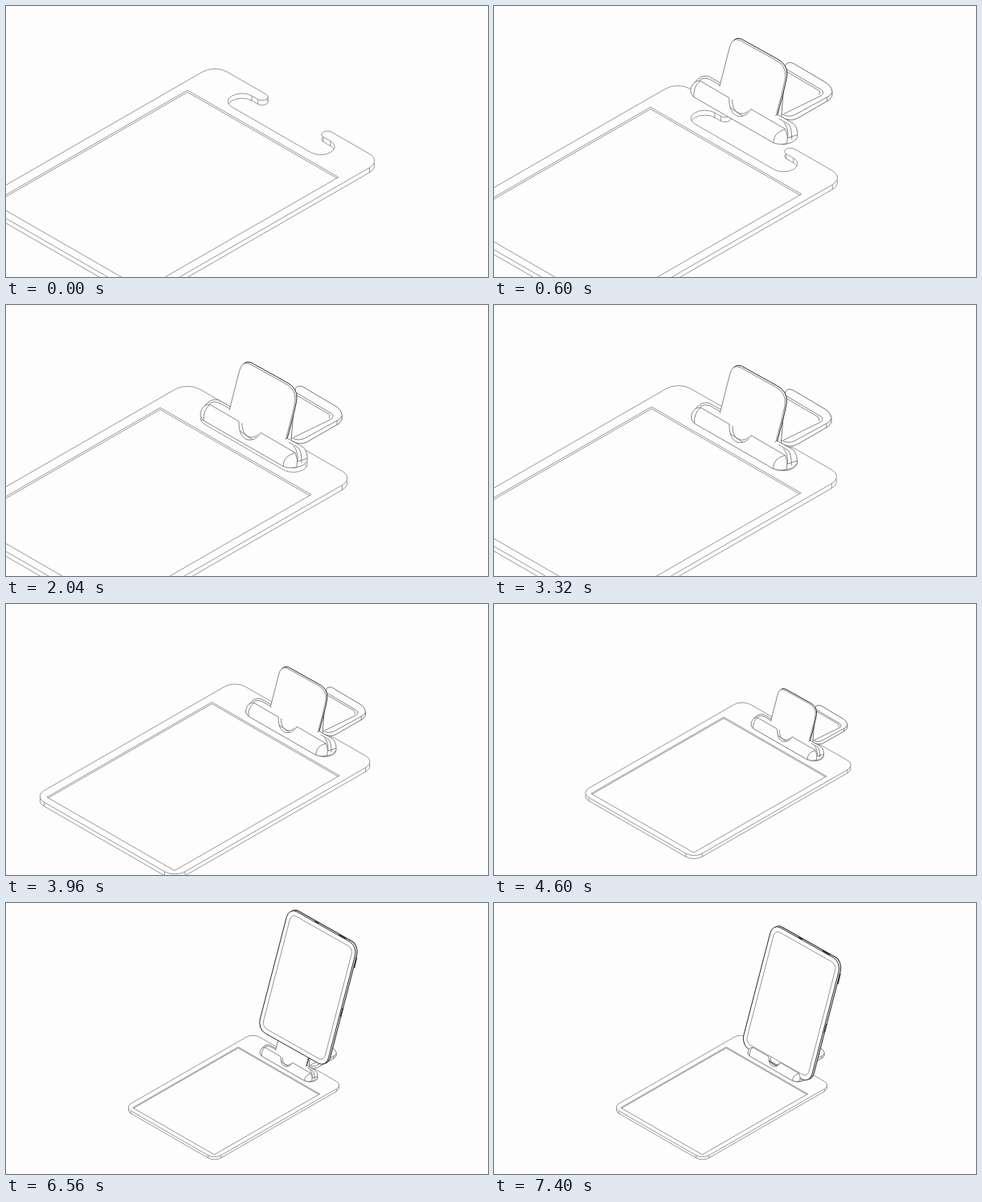
Write an HTML page with a canvas that moves like this. It is 600 px wide and 338 px high and loops after 8000 ms.

```html
<!DOCTYPE html>
<html lang="en">
<head>
<meta charset="utf-8">
<title>Clipboard stand assembly</title>
<style>
  html, body { margin: 0; width: 100%; height: 100%; overflow: hidden; background: #fdfdfd; }
  canvas { display: block; width: 600px; height: 338px; }
</style>
</head>
<body>
<canvas id="stage" width="600" height="338"></canvas>
<script>
const ctx = document.getElementById('stage').getContext('2d');
const LOOP = 8000, PAPER = '#fdfdfd', INK = '#555', DARK = '#2b2b2b';
const SLOPE = 0.577, THICKNESS = 6;

// time, paper corner x, paper corner y, zoom
const CAMERA = [
  [3280, 192, 128, 1], [3320, 196, 127, .99], [4160, 275, 121, .8], [4600, 286, 141, .68],
  [4980, 288, 168, .6], [5240, 289, 178.5, .548], [5480, 289, 179.6, .54]
];
const CLIP_IN = 480, CLIP_SEATED = 2280, CLIP_SPEED = .02;
const TABLET_IN = 5440, TABLET_SEATED = 7400, TABLET_SPEED = .0238;

function camera(t) {
  if (t < CAMERA[0][0]) {
    const rest = (1 - Math.min(t / 840, 1)) ** 2;
    return [192 + 34 * rest, 128 - 23 * rest, 1];
  }
  const next = CAMERA.findIndex(key => key[0] > t);
  if (next < 0) return CAMERA.at(-1).slice(1);
  const from = CAMERA[next - 1], to = CAMERA[next];
  const p = (t - from[0]) / (to[0] - from[0]);
  return [1, 2, 3].map(i => from[i] + (to[i] - from[i]) * p);
}

function mapped(path, matrix) {
  const result = new Path2D();
  result.addPath(path, new DOMMatrix(matrix));
  return result;
}
const onBoard = path => mapped(path, [1, SLOPE, -1, SLOPE, 0, 0]);
const shifted = (path, x, y) => mapped(path, [1, 0, 0, 1, x, y]);

function boardOutline() {
  const p = new Path2D(), q = Math.PI / 2;
  const left = -10.5, right = 197, top = -44.5, bottom = 251.5, r = 15;
  p.moveTo(left + r, top);
  p.arc(53.6, -39.25, 5.25, -q, q);
  p.arc(46, -21.75, 12.25, -q, q, true);
  p.arc(144, -21.75, 12.25, q, -q, true);
  p.arc(135, -39.25, 5.25, q, 3 * q);
  p.arcTo(right, top, right, bottom, r);
  p.arcTo(right, bottom, left, bottom, r);
  p.arcTo(left, bottom, left, top, r);
  p.arcTo(left, top, right, top, r);
  p.closePath();
  return onBoard(p);
}

function boardVerticals() {
  const p = new Path2D();
  const ends = [[197, -29.5], [197, 236.5], [182, 251.5], [4.5, 251.5], [46, -34], [53.6, -34],
    [57.3, -43], [135, -34], [144, -34]];
  for (const [a, b] of ends) {
    p.moveTo(a - b, (a + b) * SLOPE);
    p.lineTo(a - b, (a + b) * SLOPE + THICKNESS);
  }
  return p;
}

function rounded(x, y, w, h, r) {
  const p = new Path2D();
  p.roundRect(x, y, w, h, r);
  return p;
}

const board = boardOutline(), verticals = boardVerticals();
const recess = onBoard(rounded(0, 0, 188, 243, 0));

const clip = {
  leg: new Path2D('M360 88Q364 83 370 86L412 111Q420 117 418 127L414 132L374 155Q366 159 355 153Z'),
  legLines: new Path2D('M361 93L405 119Q409 122 405 126L358 149M361 96L402 120Q404 122 402 125M418 122Q417 126 412 128L372 150Q364 154 355 149M412 128V133'),
  rear: new Path2D('M247 110Q254 100 264 102L370 161Q376 167 375 178Q371 186 357 187Z'),
  rearLines: new Path2D('M253 107Q258 103 266 106L280 114M352 155L364 162Q368 166 368 181M358 160Q364 166 363 179L375 175'),
  plate: new Path2D('M278 115L290 68Q293 53 303 57L348 82Q361 89 360 102Q359 112 348 152'),
  front: new Path2D('M290 129L254 108Q247 107 243 115Q240 123 246 128L345 185Q352 188 362 186Q364 176 360 168L317 143C311 156 289 158 290 129Z'),
  frontLines: new Path2D('M254 108Q245 115 246 128M360 168Q345 172 345 185M294 131C293 150 308 152 314 145')
};
const plateBack = shifted(clip.plate, 2, -1.5);

const tabletPlane = [85.2 / 180, 48.3 / 180, -39.3 / 250, 151.6 / 250, 347, 25.4];
const tablet = mapped(rounded(0, 0, 180, 250, 20), tabletPlane);
const tabletBack = shifted(tablet, 2.2, -.8);
const tabletScreen = mapped(rounded(9, 9, 162, 232, 12), tabletPlane);
const tabletButtons = new Path2D('M431 88L428 101M379 42.5L384 45.5M409 59.5L418 64.5M414 151L411 162');

function stroke(path, width = .7, color = INK) {
  ctx.lineWidth = width / ctx.getTransform().a;
  ctx.strokeStyle = color;
  ctx.stroke(path);
}

function solid(path, width, color) {
  ctx.fillStyle = PAPER;
  ctx.fill(path);
  stroke(path, width, color);
}

function drawBoard() {
  const hairline = .6;
  solid(shifted(board, 0, THICKNESS), hairline);
  stroke(verticals, hairline);
  solid(board, hairline);
  stroke(recess, hairline);
  ctx.save();
  ctx.clip(recess);
  stroke(shifted(recess, 0, 2.4), hairline);
  ctx.restore();
}

function drawClipBack() {
  solid(clip.leg, .8);
  stroke(clip.legLines);
  solid(clip.rear);
  stroke(clip.rearLines);
  solid(plateBack, 1, DARK);
  solid(clip.plate);
}

function drawClipFront() {
  solid(clip.front);
  stroke(clip.frontLines);
}

function drawTablet(t) {
  const lift = Math.max(0, TABLET_SEATED - t) * TABLET_SPEED;
  ctx.setTransform(1, 0, 0, 1, lift * .27, -lift);
  solid(tabletBack, 1.1, DARK);
  solid(tablet, 1, DARK);
  stroke(tabletScreen, .6);
  stroke(tabletButtons, 1.5, DARK);
}

function draw(t) {
  const [x, y, zoom] = camera(t);
  const lift = Math.max(0, CLIP_SEATED - t) * CLIP_SPEED;
  const placeClip = () =>
    ctx.setTransform(zoom, 0, 0, zoom, x - 192 * zoom, y - (107 + lift) * zoom);

  ctx.setTransform(1, 0, 0, 1, 0, 0);
  ctx.fillStyle = PAPER;
  ctx.fillRect(0, 0, 600, 338);
  ctx.setTransform(zoom, 0, 0, zoom, x, y);
  drawBoard();
  if (t < CLIP_IN) return;
  placeClip();
  drawClipBack();
  if (t >= TABLET_IN) drawTablet(t);
  placeClip();
  drawClipFront();
}

const start = performance.now();
function tick() {
  draw((performance.now() - start) % LOOP);
  requestAnimationFrame(tick);
}
tick();
</script>
</body>
</html>
```
